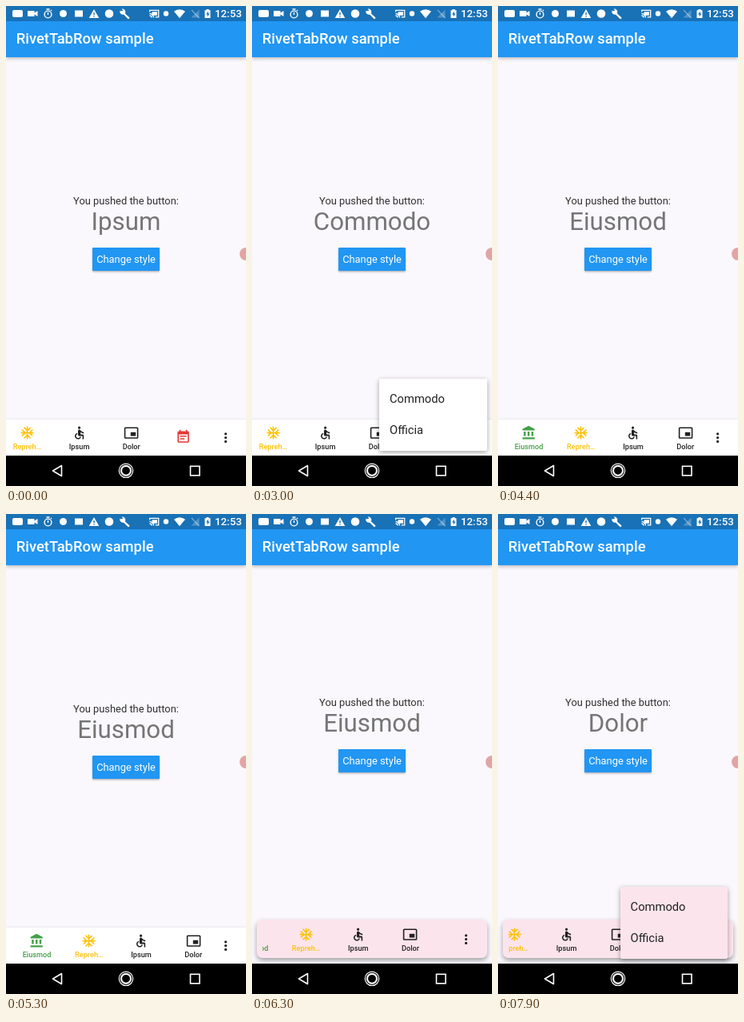
An HTML page for the animation above (8 s loop, 300x600 px).

```html
<!DOCTYPE html>
<html lang="en">
<head>
<meta charset="utf-8">
<title>App bar demo</title>
<style>
html, body { margin: 0; width: 100%; height: 100%; overflow: hidden; background: #faf8fc; }
body { position: relative; font-family: Roboto, sans-serif; color: #212121; }
div, svg { position: absolute; }
.status { left: 0; top: 0; width: 300px; height: 19.2px; background: #1971b6; }
.app { left: 0; top: 19.2px; width: 300px; height: 44.8px; background: #2196f3;
  box-shadow: 0 2px 4px rgba(0,0,0,.24); }
.app div { left: 12.8px; top: 0; line-height: 44.8px; font-size: 18.4px; font-weight: 500; color: #fff; white-space: nowrap; }
.body { left: 0; top: 0; width: 300px; text-align: center; white-space: nowrap; }
.body div { width: 300px; left: 0; }
.hint { top: 235.5px; font-size: 12.88px; line-height: 15px; color: #303030; }
.word { top: 250.5px; font-size: 31.28px; line-height: 37px; color: #757575; }
.body .btn { left: 108px; top: 302px; width: 84px; height: 29px; line-height: 30px; border-radius: 1px;
  font-size: 12.88px; color: #fff; background: #2196f3; box-shadow: 0 1.5px 2px rgba(0,0,0,.28); }
.bar { left: 0; top: 516.8px; width: 300px; height: 45.2px; background: #fff; box-shadow: 0 0 3px rgba(0,0,0,.12); }
.float .bar { left: 6.4px; top: 507.2px; width: 287.2px; height: 48px; border-radius: 7px;
  background: #fce4ec; box-shadow: 0 3px 6px rgba(0,0,0,.36); }
.view { left: 6px; top: 517px; width: 249.2px; height: 45px; overflow: hidden; }
.float .view { left: 12.8px; top: 509px; width: 236px; }
.item { top: 0; width: 65.2px; height: 45px; text-align: center; fill: currentColor; }
.item svg { left: 23px; top: 7.4px; width: 19.2px; height: 19.2px; }
.item.bare svg { top: 12.4px; }
.item div { left: 0; width: 100%; top: 28.4px; font-size: 9.2px; font-weight: 500; line-height: 11px; }
.more { left: 264.5px; top: 529.6px; width: 19.2px; height: 19.2px; fill: #212121; }
.float .more { left: 258.1px; top: 521.6px; }
.menu { right: 6.4px; overflow: hidden; border-radius: 2px; background: #fff;
  box-shadow: 0 2px 6px rgba(0,0,0,.36); }
.float .menu { right: 12.8px; background: #fce4ec; }
.list { right: 0; top: 0; width: 134.4px; height: 89.6px; }
.list div { left: 12.8px; line-height: 38.4px; font-size: 14.72px; }
.nav { left: 0; top: 562px; width: 300px; height: 38px; background: #000; }
.dot { left: 292px; top: 302px; width: 16px; height: 16px; border-radius: 50%; background: #e3a4a6; }
#stage { left: 0; top: 0; width: 300px; height: 600px; overflow: hidden; background: #faf8fc; }
</style>
</head>
<body>
<div id="stage">
  <div class="body" id="body">
    <div class="hint">You pushed the button:</div>
    <div class="word" id="word">Ipsum</div>
    <div class="btn">Change style</div>
  </div>
  <div class="app"><div>RivetTabRow sample</div></div>
  <div class="status">
    <svg width="300" height="20" fill="#fff" stroke="none">
      <rect x="8" y="5" width="13" height="9" rx="2"/>
      <path d="M27 6h8.500v2.500l4-2.500v7l-4-2.500v2.500h-8.500z"/>
      <g fill="none" stroke="#fff" stroke-width="1.400">
        <circle cx="52.500" cy="10.500" r="4.400"/>
        <path d="M50.500 4h4M52.500 8v3M56 6l1-1"/>
      </g>
      <circle cx="71.500" cy="9.500" r="4.500"/>
      <rect x="86" y="5.500" width="10" height="8"/>
      <path fill-rule="evenodd" d="M110 4l6.300 11h-12.600zM109.400 8v3.500h1.300v-3.500zM109.400 12.400v1.300h1.300v-1.300z"/>
      <circle cx="129" cy="9.500" r="5.300"/>
      <path d="M145 7l6 6 2.200 2" stroke="#fff" stroke-width="2.400" stroke-linecap="round"/>
      <path d="M142.500 5.500l2.300 2 1.700-1.700-2-2.300a4 4 0 0 1 4.700 5l-2.200 2.200a4 4 0 0 1-4.500-5.200z"/>
      <path d="M179.700 7.500V5.300h11v8.600h-4M179.500 9.500a5 5 0 0 1 5 5M179.500 12a2.500 2.500 0 0 1 2.500 2.500"
        fill="none" stroke="#fff" stroke-width="1.300"/>
      <rect x="182.500" y="7.300" width="6.500" height="4.500"/>
      <circle cx="200" cy="9.500" r="3.200"/>
      <path d="M217 15.300l-7-8.600a11 11 0 0 1 14 0z"/>
      <path d="M231.500 14.500l10-10v10z" opacity=".25"/>
      <path d="M232 5l9.500 10" stroke="#fff" stroke-width="1.200" opacity=".4"/>
      <path fill-rule="evenodd" d="M248.500 5.300h2v-1.300h3v1.300h2v9.700h-7zM252.800 6.500l-2.800 4h1.700v3l2.800-4h-1.700z"/>
      <text x="261" y="14" font-size="13.300" font-weight="500">12:53</text>
    </svg>
  </div>
  <div class="bar"></div>
  <div class="view" id="view"></div>
  <svg class="more" viewBox="0 0 24 24"><circle cx="12" cy="6" r="2"/><circle cx="12" cy="12" r="2"/><circle cx="12" cy="18" r="2"/></svg>
  <div class="menu" id="menu">
    <div class="list">
      <div style="top:6.4px">Commodo</div>
      <div style="top:44.8px">Officia</div>
    </div>
  </div>
  <div class="dot"></div>
  <div class="nav">
    <svg width="300" height="38" fill="none" stroke="#fff" stroke-width="1.600">
      <path d="M69.500 12.500v13l-11-6.500z" stroke-linejoin="round"/>
      <circle cx="150" cy="18.800" r="8.700" stroke-width="1.200"/>
      <circle cx="150" cy="18.800" r="6" stroke-width="2.200"/>
      <rect x="230.500" y="13.300" width="11.500" height="11.500"/>
    </svg>
  </div>
</div>
<script>
const LOOP = 8000, STEP = 100, ITEM_W = 65.2, MENU_W = 134.4, MENU_H = 89.6, FLOOR = 555.6;
const $ = id => document.getElementById(id);
const clamp = x => Math.max(0, Math.min(1, x));

const items = [
  ['Eiusmod', '#43a047', 'M4 10v7h3v-7H4zm6 0v7h3v-7h-3zM2 22h19v-3H2v3zm14-12v7h3v-7h-3zm-4.500-9L2 6v2h19V6l-9.500-5z'],
  ['Repreh…', '#ffc107', 'M22 11h-4.170l3.240-3.240-1.410-1.420L15 11h-2V9l4.660-4.660-1.420-1.410L13 6.170V2h-2v4.170L7.760 2.930 6.340 4.340 11 9v2H9L4.340 6.340 2.930 7.760 6.170 11H2v2h4.170l-3.240 3.240 1.410 1.420L9 13h2v2l-4.660 4.660 1.420 1.410L11 17.830V22h2v-4.170l3.240 3.240 1.420-1.410L13 15v-2h2l4.660 4.660 1.410-1.420L17.830 13H22z'],
  ['Ipsum', '#212121', 'M10 4a2 2 0 1 0 4 0a2 2 0 1 0-4 0zM19 13v-2c-1.540.02-3.090-.75-4.070-1.830l-1.290-1.430c-.5-.5-1.100-.76-1.830-.72C10.760 7.110 10 8.040 10 9.090V15c0 1.100.9 2 2 2h5v5h2v-5.500c0-1.100-.9-2-2-2h-3v-3.450c1.290 1.070 3.250 1.940 5 1.950zm-6.170 5c-.41 1.160-1.520 2-2.830 2-1.660 0-3-1.340-3-3 0-1.310.84-2.410 2-2.830V12.100c-2.280.46-4 2.480-4 4.900 0 2.760 2.240 5 5 5 2.420 0 4.440-1.720 4.900-4h-2.070z'],
  ['Dolor', '#212121', 'M19 11h-8v6h8v-6zm4 8V5c0-1.100-.9-2-2-2H3c-1.100 0-2 .9-2 2v14c0 1.100.9 2 2 2h18c1.100 0 2-.9 2-2zm-2 0H3V5h18v14z'],
  ['', '#e53935', 'M17 10H7v2h10v-2zm2-7h-1V1h-2v2H8V1H6v2H5c-1.100 0-2 .9-2 2v14c0 1.100.9 2 2 2h14c1.100 0 2-.9 2-2V5c0-1.100-.9-2-2-2zm0 16H5V8h14v11zm-5-5H7v2h7v-2z']
];
$('view').innerHTML = items.map(([name, color, d]) =>
  `<div class="item${name ? '' : ' bare'}" style="color:${color}">
    <svg viewBox="0 0 24 24"><path fill-rule="evenodd" d="${d}"/></svg><div>${name}</div></div>`).join('');
const cells = [...$('view').children];
const rows = [...document.querySelectorAll('.list div')];

const words = [[0, 'Ipsum'], [600, 'Dolor'], [1200, 'Velit'], [2500, 'Commodo'],
  [3400, 'Officia'], [4200, 'Eiusmod'], [6900, 'Dolor']];

// [open start, open duration, close start]
const menus = [[1800, 300, 2400], [2999, 1, 3300], [7400, 300, 9000]];

function menuValue(t) {
  for (const [start, dur, close] of menus) {
    if (t < start || t > close + 300) continue;
    return t < close ? clamp((t - start) / dur) : clamp((1 - (t - close) / 300) * 1.5);
  }
  return 0;
}

function scrollAt(t) {
  if (t < 3900) return 77.4;
  if (t < 6200) return 0;
  return 90.2 * (1 - (1 - clamp((t - 6200) / 400)) ** 2.25);
}

function drawMenu(v, floating) {
  const unit = 1 / 3.5, s = $('menu').style;
  const h = MENU_H * clamp(v / (2 * unit));
  s.display = v > 0 ? '' : 'none';
  s.opacity = clamp(v * 3);
  s.width = MENU_W * clamp(v / unit) + 'px';
  s.height = h + 'px';
  s.top = Math.min(floating ? 512 : 520, FLOOR - h) + 'px';
  rows.forEach((r, i) => r.style.opacity = clamp((v - (i + 1) * unit) / (1.5 * unit)));
}

function draw(t) {
  const floating = t >= 5400;
  $('stage').className = floating ? 'float' : '';
  $('body').style.top = floating ? '-8px' : '0';
  $('word').textContent = words.filter(w => w[0] <= t).pop()[1];
  const x = scrollAt(t);
  cells.forEach((c, i) => c.style.left = i * ITEM_W - x + 'px');
  drawMenu(menuValue(t), floating);
}

// The screen refreshes ten times a second
const t0 = performance.now();
function tick() {
  const t = (performance.now() - t0) % LOOP;
  draw(Math.floor(t / STEP) * STEP);
  requestAnimationFrame(tick);
}
tick();
</script>
</body>
</html>
```
